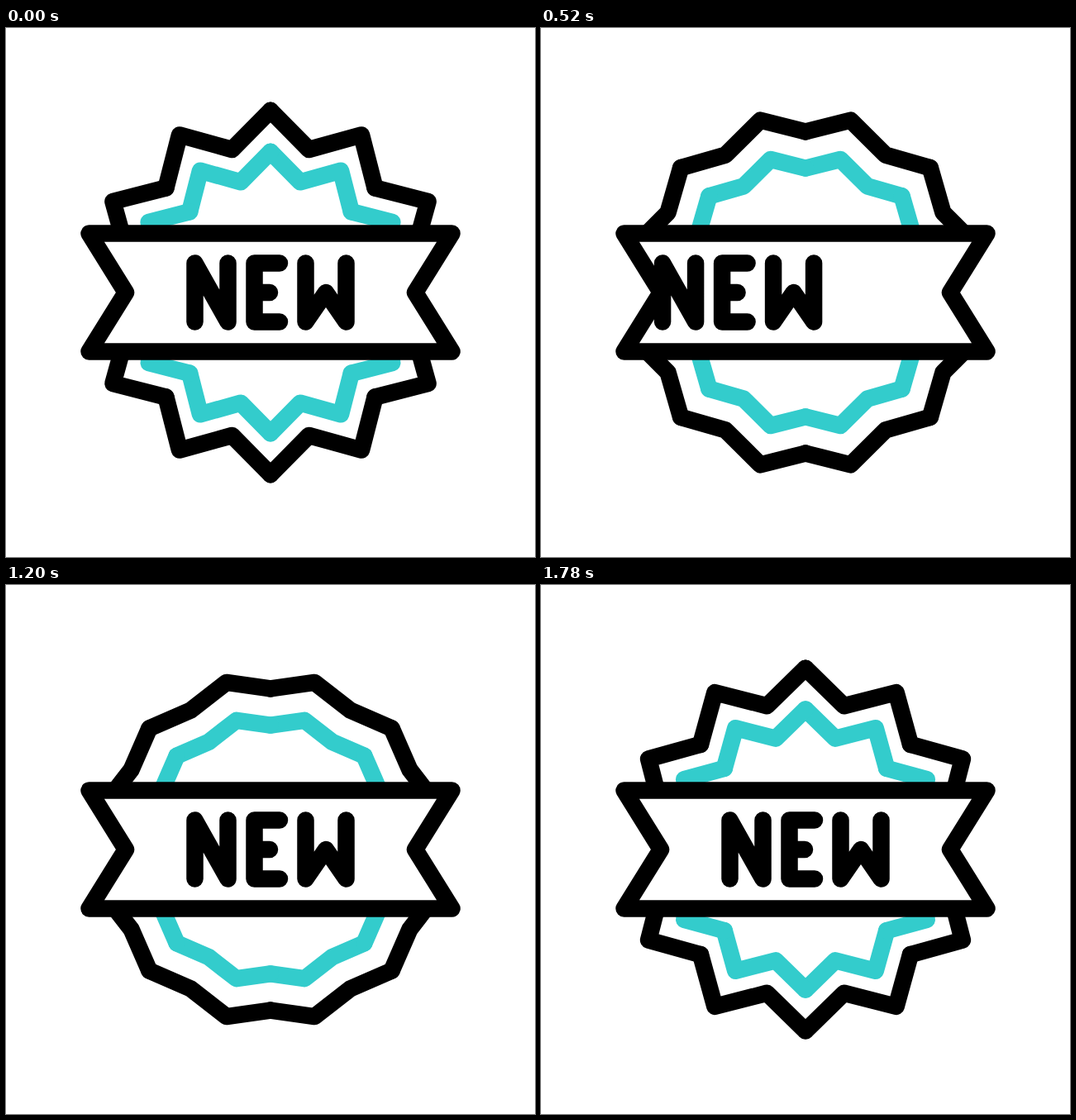
Recreate the animation shown at these times as an HTML page without scripts. Size 640 px wide and 640 px high, loop 1800 ms.

```html
<!DOCTYPE html>
<html lang="en">
<head>
<meta charset="utf-8">
<title>New badge</title>
<style>
  html, body { margin: 0; width: 100%; height: 100%; overflow: hidden; background: #fff; }
  svg { display: block; width: 100vw; height: 100vh; }
  .line { fill: none; stroke: #000; stroke-width: 20.5; stroke-linecap: round; stroke-linejoin: round; }
  .inner { stroke: #3cc; stroke-width: 26.5; }
  .ribbon { fill: #fff; }
</style>
</head>
<body>
<svg viewBox="-320 -320 640 640" role="img" aria-label="NEW">
  <defs>
    <!-- One eighth of the star: rest, stretched, points swapped, rest -->
    <path id="eighth" d="M0-220L46.5-173 110-190.5 126.5-126.5">
      <animate attributeName="d" dur="1.8s" repeatCount="indefinite" calcMode="spline"
        keyTimes="0;.1;.3333;1" keySplines="0 0 1 1;0 0 1 1;.4 0 .85 .85"
        values="M0-220L46.5-173 110-190.5 126.5-126.5;
                M0-249L47-173 126-205 126.5-126.5;
                M0-182L56.5-216.5 90-157.5 156.5-156.5;
                M0-220L46.5-173 110-190.5 126.5-126.5"/>
    </path>
    <!-- Mirrored on the diagonal, then on both axes -->
    <g id="quarter">
      <use href="#eighth"/>
      <use href="#eighth" transform="matrix(0 -1 -1 0 0 0)"/>
    </g>
    <g id="half">
      <use href="#quarter"/>
      <use href="#quarter" transform="scale(-1 1)"/>
    </g>
    <g id="star">
      <use href="#half"/>
      <use href="#half" transform="scale(1 -1)"/>
    </g>
    <path id="band" d="M-219.5-71.5H219.5L175 0 219.5 71.5H-219.5L-175 0Z"/>
    <path id="word" d="M-91.5 35.5V-35.5L-51.5 35.5V-35.5M11-35.5H-19.5V35.5H11M-19.5 0H-1M42.5-35.5V35.5L67 0 91.5 35.5V-35.5"/>
    <clipPath id="window"><use href="#band"/></clipPath>
  </defs>

  <use href="#star" class="line inner" transform="scale(.773)"/>
  <use href="#star" class="line"/>
  <rect x="-320" y="-72" width="640" height="144" fill="#fff"/>
  <use href="#band" class="line ribbon"/>

  <!-- The word leaves on the right while its copy enters on the left -->
  <g clip-path="url(#window)">
    <g class="line">
      <animateTransform attributeName="transform" type="translate" dur="1.8s" repeatCount="indefinite"
        calcMode="spline" keyTimes="0;.1111;.35;1" keySplines="0 0 1 1;.333 0 .667 1;0 0 1 1"
        values="0 0;0 0;508 0;508 0"/>
      <use href="#word"/>
      <use href="#word" x="-508"/>
    </g>
  </g>
</svg>
</body>
</html>
```
